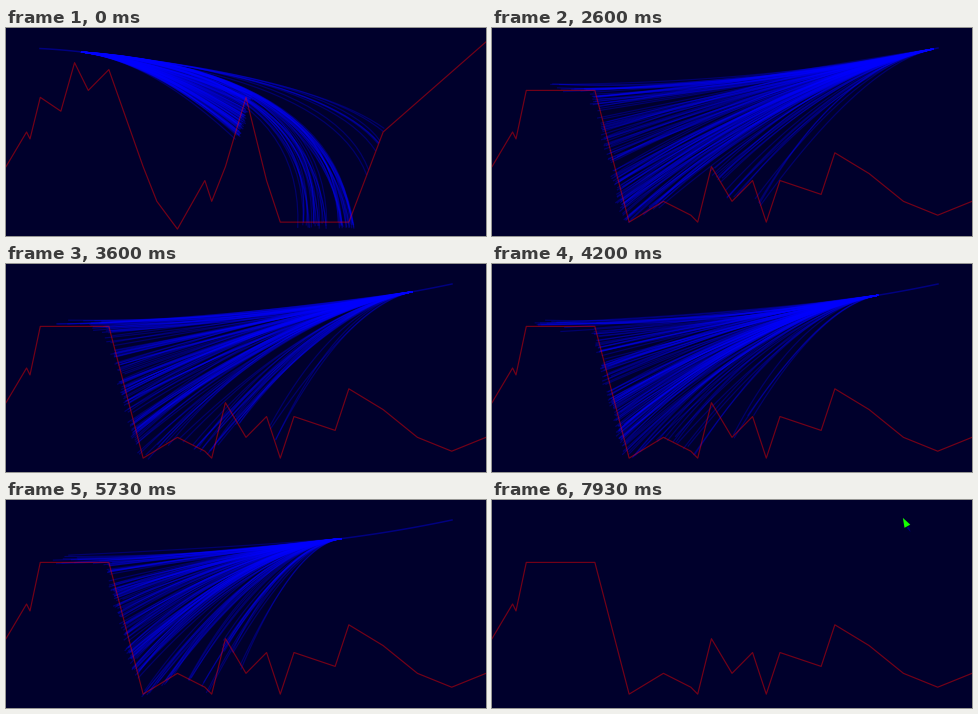
A matplotlib script for the animation above (8000 ms loop, 480 px wide and 208 px high).

```python
import matplotlib.pyplot as plt
import numpy as np
from matplotlib.animation import FuncAnimation
from matplotlib.collections import LineCollection

W, H, DPI = 480, 208, 100
FRAMES, LOOP_MS = 120, 8000
PX = 72 / DPI  # one pixel in points

# Phase boundaries, in frames
LAUNCH_1, SWITCH, LAUNCH_2 = 10, 37, 115

# Terrain corners in metres on a 7000 x 3000 map
WEST = [(0, 1000), (300, 1500), (350, 1400)]
CANYON = WEST + [(500, 2000), (800, 1800), (1000, 2500), (1200, 2100),
                 (1500, 2400), (2000, 1000), (2200, 500), (2500, 100),
                 (2900, 800), (3000, 500), (3200, 1000), (3500, 2000),
                 (3800, 800), (4000, 200), (5000, 200), (5500, 1500), (7000, 2800)]
PLATEAU = WEST + [(500, 2100), (1500, 2100), (2000, 200), (2500, 500),
                  (2900, 300), (3000, 200), (3200, 1000), (3500, 500),
                  (3800, 800), (4000, 200), (4200, 800), (4800, 600),
                  (5000, 1200), (5500, 900), (6000, 500), (6500, 300), (7000, 500)]

BODY = np.array([(0, -6), (3.3, 3.5), (-3.3, 3.5)])
FLAME = np.array([(-1.5, 4.5), (1.5, 4.5), (0, 10)])


def to_pixels(points):
    return np.array(points) * (W / 7000, -H / 3000) + (0, H)


canyon, plateau = to_pixels(CANYON), to_pixels(PLATEAU)


def canyon_flight(u):
    """Cruise right, brake smoothly above the pad, sink at a steady rate."""
    x = 343 - 36 * np.log1p(np.exp((309 - 18.6 * u) / 36))
    fall = min(u, 16)
    y = 20 + 1.2 * fall + 0.265 * fall ** 2 + 8.3 * (u - fall)
    return x, y, 24 - 114 * np.exp(-0.8 * u)


def plateau_flight(u):
    return 446 - 8.6 * u - 0.72 * u ** 2, 20 + 0.35 * u ** 2, 24 + 66 * np.exp(-0.9 * u)


def place(shape, x, y, tilt):
    a = np.radians(tilt)
    return shape @ np.array([(np.cos(a), -np.sin(a)), (np.sin(a), np.cos(a))]) + (x, y)


def bezier(start, control, end):
    t = np.linspace(0, 1, 24)[:, None]
    return (1 - t) ** 2 * start + 2 * t * (1 - t) * control + t ** 2 * np.array(end)


def glide(start, slope, end, reach=0.45):
    """Leave start along slope, then bend towards end."""
    dx = end[0] - start[0]
    return bezier(start, start + reach * dx * np.array((1, slope)), end)


def canyon_trunk(x):
    d = x - 34
    return 20.5 + 0.05 * d + 0.0008 * d ** 2


def plateau_trunk(x):
    d = 446 - x
    return 20 + 0.21 * d - 0.00038 * d ** 2


def canyon_path(rng, start, slope, over_share):
    kind = rng.random()
    if kind < over_share * 0.2:    # far wall
        y = rng.uniform(100, 150)
        control = np.array((rng.uniform(295, 340), rng.uniform(46, 52)))
        return bezier(start, control, (377 - (y - 104) * 0.38, y))
    if kind < over_share:          # landing zone
        x = 348 - 58 * rng.random() ** 2
        control = np.array((290 + 0.45 * (x - 290) + rng.uniform(0, 22),
                            rng.uniform(40, 49)))
        return bezier(start, control, (x, rng.uniform(194, 201)))
    y = 66 + 44 * rng.beta(1, 1.2) + 14 * rng.random() ** 12
    return glide(start, slope, (240 - (y - 69) * 0.3 + rng.uniform(0, 8), y))


def canyon_swarm(frame):
    rng = np.random.default_rng(7 + frame)
    x0 = 75 + 4 * (frame - 1)
    start, slope = np.array((x0, canyon_trunk(x0))), 0.05 + 0.0016 * (x0 - 34)
    paths = [canyon_path(rng, start, slope + rng.normal(0, 0.015), 0.3 + 0.03 * frame)
             for _ in range(150)]
    x = np.linspace(34, x0, 20)
    return np.column_stack((x, canyon_trunk(x))), paths


def plateau_target(rng, progress):
    kind = rng.random()
    stray, top = 0.24 - 0.21 * progress, 0.05 + 0.2 * progress
    if kind < stray:
        x = 137 + (150 - 80 * progress) * rng.random()
        return x, np.interp(x, *plateau.T)
    if kind < stray + top:
        if progress > 0.5 and rng.random() < 0.15:
            return -10, rng.uniform(57, 61)
        return rng.uniform(45, 103), rng.uniform(57, 62)
    y = 62 + (133 - 25 * progress) * rng.random() ** (0.8 + 0.4 * progress)
    return 103 + (y - 62) * 0.259 - rng.uniform(0, 5), y


def plateau_swarm(frame):
    rng = np.random.default_rng(frame)
    x0 = 446 - 2.3 * (frame - SWITCH)
    start, slope = np.array((x0, plateau_trunk(x0))), -0.21 + 0.00076 * (446 - x0)
    progress = (frame - SWITCH) / (LAUNCH_2 - SWITCH)
    paths = []
    for _ in range(75):
        target = np.array(plateau_target(rng, progress))
        for _ in range(2):
            paths.append(glide(start, slope + rng.normal(0, 0.02),
                               target + rng.normal(0, 2, 2), rng.uniform(0.4, 0.55)))
    x = np.linspace(446, x0, 20)
    return np.column_stack((x, plateau_trunk(x))), paths


fig = plt.figure(figsize=(W / DPI, H / DPI), dpi=DPI, facecolor="#00002c")
ax = fig.add_axes((0, 0, 1, 1))
ax.set(xlim=(0, W), ylim=(H, 0))
ax.axis("off")

swarm = ax.add_collection(LineCollection([], colors="#0000ff", linewidths=1.2 * PX, alpha=0.3))
trunk, = ax.plot([], [], color="#0000ff", lw=1.5 * PX, alpha=0.4)
ground, = ax.plot([], [], color="#ff0000", lw=1.2 * PX, alpha=0.45)
flame, = ax.fill([0, 0, 0], [0, 0, 0], color="#000078", lw=0)
body, = ax.fill([0, 0, 0], [0, 0, 0], color="#14ff00", lw=0)


def update(frame):
    first = frame < SWITCH
    flying = LAUNCH_1 <= frame < SWITCH or frame >= LAUNCH_2
    ground.set_data(*(canyon if first else plateau).T)
    for part in (body, flame):
        part.set_visible(flying)
    for part in (swarm, trunk):
        part.set_visible(not flying)
    if flying:
        pose = canyon_flight(frame - LAUNCH_1) if first else plateau_flight(frame - LAUNCH_2)
        body.set_xy(place(BODY, *pose))
        flame.set_xy(place(FLAME, *pose))
    else:
        stem, paths = canyon_swarm(max(frame, 1)) if first else plateau_swarm(frame)
        trunk.set_data(*stem.T)
        swarm.set_segments(paths)
    return swarm, trunk, ground, flame, body


anim = FuncAnimation(fig, update, frames=FRAMES, interval=LOOP_MS / FRAMES,
                     repeat=True, repeat_delay=0)
plt.show()
```
